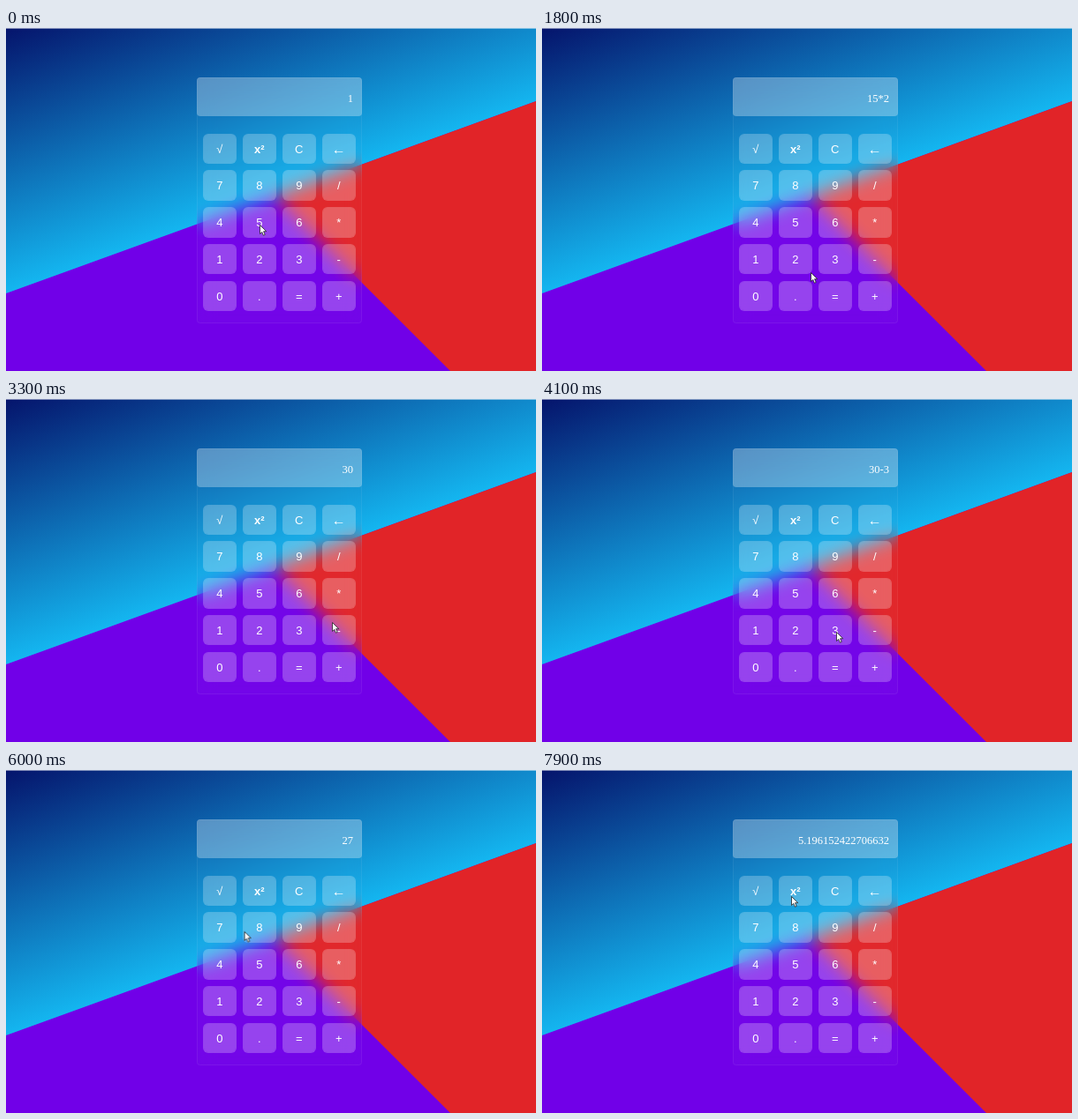
These frames come from a looping animation (600x389 px, 8000 ms). An HTML page:

```html
<!DOCTYPE html>
<html lang="en">
<head>
<meta charset="utf-8">
<title>Glass calculator</title>
<style>
  html, body { margin: 0; width: 100%; height: 100%; overflow: hidden; }
  .stage { position: relative; width: 600px; height: 389px; overflow: hidden; }
  .stage > * { position: absolute; }
  .back { left: 0; top: 0; }

  .calc {
    left: 216px; top: 56px; width: 187px; height: 279px;
    box-sizing: border-box;
    border: 1px solid rgba(255, 255, 255, .06);
    border-radius: 4px;
    background: rgba(255, 255, 255, .02);
    backdrop-filter: blur(10px);
  }
  .display {
    left: 216px; top: 56px; width: 187px; height: 44px;
    border-radius: 4px;
    background: rgba(255, 255, 255, .3);
  }
  .window {
    position: absolute; right: 10px; top: 13.5px;
    width: 170px; height: 20px; overflow: hidden;
    font: 12.5px/20px "Liberation Serif", "Times New Roman", serif;
    color: #fff; text-align: right;
  }
  .lines { animation: entry 8s step-end infinite; }
  .lines div { height: 20px; }

  .keys {
    left: 223px; top: 119.5px;
    display: grid; gap: 7.3px 7.4px;
    grid-template-columns: repeat(4, 37.6px);
    grid-auto-rows: 34.5px;
    font: 13px/33px "Liberation Sans", Arial, sans-serif;
    color: #fff; text-align: center;
  }
  .keys span {
    box-sizing: border-box;
    border: 1px solid rgba(255, 255, 255, .24);
    border-radius: 6px;
    background: rgba(255, 255, 255, .25);
    background-clip: padding-box;
  }
  .keys .bold { font-weight: bold; }
  .keys .arrow { font-size: 16px; }

  .cursor { left: 0; top: 0; animation: travel 8s ease-in-out infinite; }

  @keyframes entry {
    0%     { transform: translateY(0); }
    2.5%   { transform: translateY(-20px); }
    12.5%  { transform: translateY(-40px); }
    20%    { transform: translateY(-60px); }
    28.75% { transform: translateY(-80px); }
    42.5%  { transform: translateY(-100px); }
    50%    { transform: translateY(-120px); }
    58.75% { transform: translateY(-140px); }
    81.25% { transform: translateY(-160px); }
    100%   { transform: translateY(-160px); }
  }
  @keyframes travel {
    0%, 3.75%      { transform: translate(287px, 223px); }
    7.5%           { transform: translate(399px, 212px); }
    11.25%, 13.75% { transform: translate(378px, 219px); }
    18.75%, 20.5%  { transform: translate(289px, 265px); }
    22.5%          { transform: translate(304px, 277px); }
    26.25%, 35%    { transform: translate(330px, 303px); }
    40%, 43.75%    { transform: translate(369px, 253px); }
    48.75%, 51.25% { transform: translate(333px, 264px); }
    56.25%, 68.75% { transform: translate(327px, 302px); }
    78.75%, 92.5%  { transform: translate(246px, 134px); }
    97.5%, 100%    { transform: translate(282px, 143px); }
  }
</style>
</head>
<body>
<div class="stage">
  <svg class="back" width="600" height="389">
    <defs>
      <linearGradient id="sky" gradientUnits="userSpaceOnUse" x1="0" y1="0" x2="96.8" y2="266">
        <stop offset="0" stop-color="#05146c"/>
        <stop offset="1" stop-color="#14b6f0"/>
      </linearGradient>
    </defs>
    <rect width="600" height="389" fill="url(#sky)"/>
    <path d="M0 301L304.4 190.4L600 83V389H0Z" fill="#7100e8"/>
    <path d="M304.4 190.4L600 83V389H503Z" fill="#e12428"/>
    <rect width="600" height="1" fill="#fff" opacity=".5"/>
  </svg>

  <div class="calc"></div>
  <div class="display">
    <div class="window">
      <div class="lines">
        <div>1</div>
        <div>15</div>
        <div>15*</div>
        <div>15*2</div>
        <div>30</div>
        <div>30-</div>
        <div>30-3</div>
        <div>27</div>
        <div>5.196152422706632</div>
      </div>
    </div>
  </div>

  <div class="keys">
    <span>√</span><span class="bold">x²</span><span>C</span><span class="arrow">←</span>
    <span>7</span><span>8</span><span>9</span><span>/</span>
    <span>4</span><span>5</span><span>6</span><span>*</span>
    <span>1</span><span>2</span><span>3</span><span>-</span>
    <span>0</span><span>.</span><span>=</span><span>+</span>
  </div>

  <svg class="cursor" width="10" height="15">
    <path d="M.5 .5V10.5L2.8 8.4L4.4 12.2L6.2 11.4L4.6 7.7H7.8Z"
      fill="#fff" stroke="#222" stroke-width=".8" stroke-linejoin="round"/>
  </svg>
</div>
</body>
</html>
```
